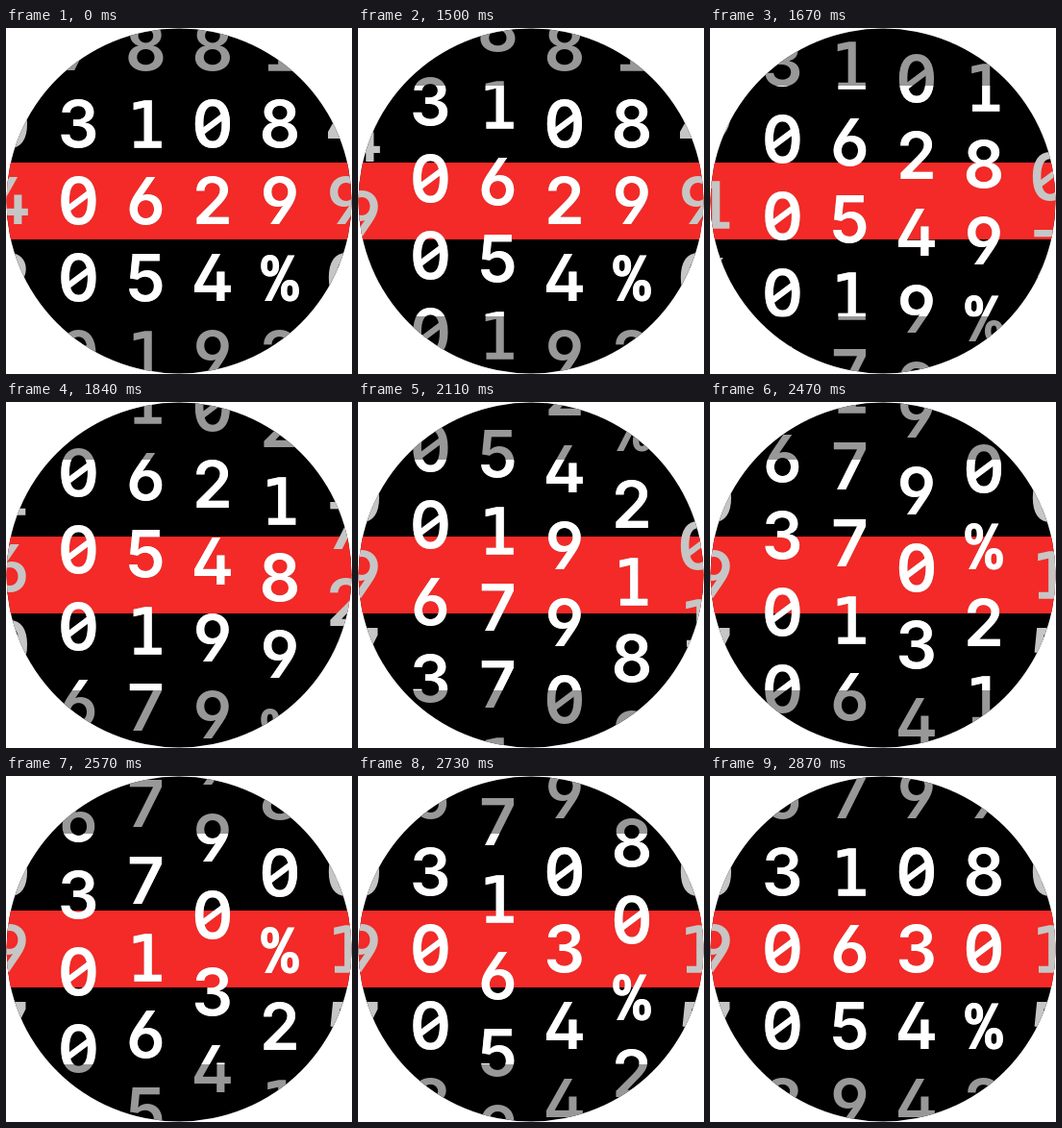
Animation, 360 px wide and 360 px high, one loop 4370 ms. Source, as an HTML page:

```html
<!DOCTYPE html>
<html lang="en">
<head>
<meta charset="utf-8">
<title>Counter</title>
<style>
  html, body { margin: 0; width: 100%; height: 100%; overflow: hidden; background: #fff; }
  svg { display: block; width: 100%; height: 100%; }
  text {
    font: 570 67px Inter, sans-serif;
    font-optical-sizing: none;
    font-feature-settings: "cv02", "cv03", "cv04", "tnum";
    text-anchor: middle;
  }
  .one { font: 400 66.5px "DejaVu Sans Mono", monospace; stroke: currentColor; stroke-width: 1.6; }
  .percent { font: 600 66px "Noto Sans Mono", monospace; }
  .slash { stroke: currentColor; stroke-width: 6; }
  text, .slash { fill: currentColor; }
</style>
</head>
<body>
<svg viewBox="0 0 360 360">
  <defs>
    <clipPath id="disc"><circle cx="180" cy="180" r="179.5"/></clipPath>
    <clipPath id="window"><rect x="40" y="60" width="280" height="240"/></clipPath>
    <g id="reels"></g>
  </defs>
  <g clip-path="url(#disc)">
    <rect width="360" height="360" fill="#000"/>
    <rect y="140" width="360" height="80" fill="#f32a27"/>
    <g id="sides" color="#c6c6c6"></g>
    <use href="#reels" color="#989898"/>
    <g clip-path="url(#window)"><use href="#reels" color="#fff"/></g>
  </g>
</svg>
<script>
const LOOP = 4370, ROW = 80, TOP = 20;

// The picture only changes at these moments.
const steps = [1500, 1670, 1840, 1940, 2110, 2240, 2340, 2470, 2570, 2600, 2730, 2800, 2870];
const keyTimes = [1500, 1840, 2110, 2470, 2730, 2870];

// rest: offset before the spin; keys: offset at each key time
const columns = [
  { x: 4, side: true, digits: "8049160973", rest: 0, keys: [65, 247, 400, 400, 400, 400] },
  { x: 75.5, digits: "7300063008", rest: 0, keys: [23, 106, 212, 361, 400, 400] },
  { x: 145.5, digits: "81651771659", rest: 0, keys: [20, 102, 206, 353, 452, 480] },
  { x: 215, digits: "8024990344", rest: 0, keys: [0, 94, 190, 327, 400, 400] },
  { x: 285, digits: "980%2189%2", rest: 400, keys: [400, 317, 233, 110, 30, 0] },
  { x: 354, side: true, digits: "8490720158", rest: 0, keys: [0, 211, 350, 400, 400, 400] }
];

function add(parent, tag, attrs) {
  const node = document.createElementNS("http://www.w3.org/2000/svg", tag);
  for (const name in attrs) node.setAttribute(name, attrs[name]);
  return parent.appendChild(node);
}

function addDigit(parent, digit, x, y) {
  const kind = { 1: "one", "%": "percent" }[digit] || "digit";
  add(parent, "text", { x, y: y + 24, class: kind }).textContent = digit;
  if (digit === "0") {
    add(parent, "path", { d: `M${x - 12} ${y + 9}L${x + 12} ${y - 9}`, class: "slash" });
  }
}

for (const col of columns) {
  const parent = document.getElementById(col.side ? "sides" : "reels");
  col.group = add(parent, "g", {});
  [...col.digits].forEach((digit, row) => addDigit(col.group, digit, col.x, TOP + row * ROW));
}

function offsetAt(col, time) {
  if (time < keyTimes[0]) return col.rest;
  const next = keyTimes.findIndex(t => t > time);
  if (next < 0) return col.keys[col.keys.length - 1];
  const part = (time - keyTimes[next - 1]) / (keyTimes[next] - keyTimes[next - 1]);
  return col.keys[next - 1] + part * (col.keys[next] - col.keys[next - 1]);
}

let shown = -1;
function draw(time) {
  const step = steps.filter(t => t <= time).pop() || 0;
  if (step === shown) return;
  shown = step;
  for (const col of columns) {
    col.group.setAttribute("transform", `translate(0 ${-offsetAt(col, step)})`);
  }
}

const start = performance.now();
function tick() {
  draw((performance.now() - start) % LOOP);
  requestAnimationFrame(tick);
}
tick();
</script>
</body>
</html>
```
